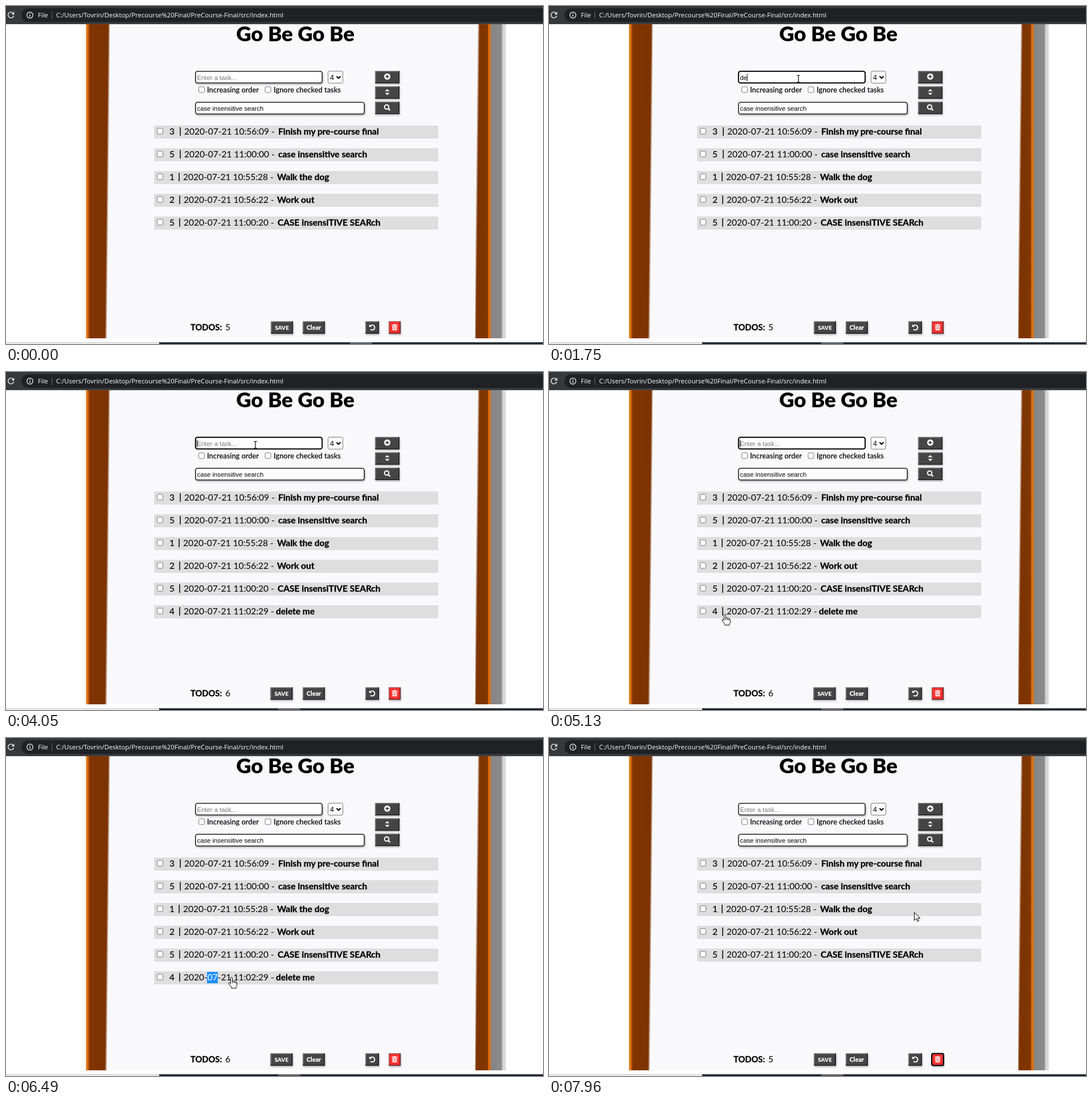
Animation, 943 px wide and 594 px high, one loop 8 s. Source, as an HTML page:

```html
<!DOCTYPE html>
<html lang="en">
<head>
<meta charset="utf-8">
<title>Task list</title>
<style>
  html, body { margin: 0; width: 100%; height: 100%; overflow: hidden; background: #fff; }
  svg { display: block; width: 943px; height: 594px; }
  text { white-space: pre; }
  .hand { font: 15.5px Lato, sans-serif; stroke-width: .2px; }
  .bold { font-weight: 700; stroke: #000; stroke-width: .3px; }
  .title { font: 900 36.5px Lato, sans-serif; }
  .label { font: 600 12.8px Lato, sans-serif; }
  .field { font: 11.3px "Liberation Sans", Arial, sans-serif; }
  .url { font: 11.3px "Open Sans", sans-serif; fill: #fff; }
</style>
</head>
<body>
<svg id="stage" viewBox="0 0 943 594">
  <defs>
    <linearGradient id="leftWood">
      <stop offset="0" stop-color="#e2801f"/><stop offset=".07" stop-color="#dc700f"/>
      <stop offset=".11" stop-color="#b85408"/><stop offset=".16" stop-color="#803400"/>
      <stop offset="1" stop-color="#7c3300"/>
    </linearGradient>
    <linearGradient id="rightEdge" gradientUnits="userSpaceOnUse" x1="824" x2="879" y1="0" y2="0">
      <stop offset="0" stop-color="#7c3300"/><stop offset=".39" stop-color="#823600"/>
      <stop offset=".43" stop-color="#d96c10"/><stop offset=".48" stop-color="#d97218"/>
      <stop offset=".52" stop-color="#858585"/><stop offset=".83" stop-color="#8c8c8c"/>
      <stop offset=".88" stop-color="#d2d2d2"/><stop offset=".96" stop-color="#dcdcdc"/>
      <stop offset="1" stop-color="#fff"/>
    </linearGradient>
    <radialGradient id="glowFill">
      <stop offset="0" stop-color="#ffe600" stop-opacity=".75"/>
      <stop offset=".75" stop-color="#ffe600" stop-opacity=".6"/>
      <stop offset="1" stop-color="#ffe600" stop-opacity=".15"/>
    </radialGradient>
    <filter id="soft" x="-2%" y="-2%" width="104%" height="104%"><feGaussianBlur stdDeviation="1.1"/></filter>
    <filter id="shadow" x="-10%" y="-30%" width="120%" height="180%">
      <feDropShadow dx="1" dy="2" stdDeviation="1.5" flood-opacity=".3"/>
    </filter>
    <clipPath id="page"><rect y="32" width="943" height="552"/></clipPath>
  </defs>
  <g id="scene"></g>
  <circle id="glow" r="11" fill="url(#glowFill)"/>
  <g id="cursor">
    <path id="arrow" d="M.5.5V14.5L4 11.4 6.2 16.5 8.4 15.5 6.2 10.6H10.8Z" fill="#fff" stroke="#000"/>
    <path id="ibeam" d="M-3-6H-1Q0-6 0-5Q0-6 1-6H3M0-5V5M-3 6H-1Q0 6 0 5Q0 6 1 6H3" fill="none" stroke="#000" stroke-width="1.2"/>
    <path id="pointer" d="M-1.5 1.5Q0-1 1.5 1.5V7Q3.5 6 4.5 8Q6.5 7 7.3 9Q9.5 8.5 9.5 11V14.5Q9.2 16.5 8 18V19.8H0V18L-4.8 11.8Q-5.3 9.4-3.2 9.8L-1.5 11.5ZM1.5 7V11M4.5 8V11M7.3 9V11.5" fill="#fff" stroke="#000"/>
  </g>
</svg>
<script>
const $ = id => document.getElementById(id);
const DURATION = 8000;

const text = (x, y, cls, value, extra = '') => `<text x="${x}" y="${y}" class="${cls}" ${extra}>${value}</text>`;
const rect = (x, y, w, h, fill, extra = '') =>
  `<rect x="${x}" y="${y}" width="${w}" height="${h}" fill="${fill}" ${extra}/>`;
const path = (d, extra) => `<path d="${d}" ${extra}/>`;
const checkbox = (x, y) => rect(x + .5, y + .5, 10, 10, '#fff', 'rx="1.8" stroke="#767676"');
const field = (x, y, w, id) =>
  rect(x + .8, y + .8, w - 1.6, 20.4, '#fff', `id="${id}" rx="3.5" stroke="#222" stroke-width="1.6" filter="url(#shadow)"`);

function button(x, y, w, icon, fill = '#444') {
  const h = 22, light = fill === '#444' ? '#7d7d7d' : '#a55', dark = fill === '#444' ? '#222' : '#622';
  return `<g transform="translate(${x} ${y})">${rect(0, 0, w, h, fill, 'filter="url(#shadow)"')}
    ${path(`M.8 ${h}V.8H${w}`, `fill="none" stroke="${light}" stroke-width="1.6"`)}
    ${path(`M0 ${h - .8}H${w - .8}V0`, `fill="none" stroke="${dark}" stroke-width="1.6"`)}
    <g transform="translate(${w / 2} ${h / 2})" fill="#fff" stroke="#fff" stroke-width="0">${icon}</g></g>`;
}
const caption = (value, size) =>
  `<text y="3.6" text-anchor="middle" style="font:900 ${size}px Lato,sans-serif">${value}</text>`;

const icons = {
  add: '<circle cy="-1" r="5.5"/>' + path('M-3-1H3M0-4V2', 'stroke="#444" stroke-width="1.8"'),
  sort: path('M-4-2.2L0-6 4-2.2ZM-4 .8H4L0 4.6Z', ''),
  search: '<circle cx="-1" cy="-1.5" r="3.8" fill="none" stroke-width="2"/>' + path('M2 1.5L5 4.5', 'stroke-width="2.4"'),
  undo: path('M-3.2-3A4.4 4.4 0 1 1-3 3.2', 'fill="none" stroke-width="1.9"') + path('M-5.2-5.5V-.9H-.6Z', ''),
  trash: path('M-5-5H-2L-1.2-6H1.2L2-5H5V-3.5H-5ZM-4.2-2.5H4.2L3.6 5H-3.6Z', '') +
    path('M-1.8-1V3.6M0-1V3.6M1.8-1V3.6', 'stroke="#f33" stroke-width=".8"'),
};

const tasks = [
  [3, '10:56:09', 'Finish my pre-course final', 313, 478],
  [5, '11:00:00', 'case insensitive search', 313, 478],
  [1, '10:55:28', 'Walk the dog', 311, 476],
  [2, '10:56:22', 'Work out', 312, 476],
  [5, '11:00:20', 'CASE insensiTIVE SEARch', 312, 477],
  [4, '11:02:29', 'delete me', 312, 474],
];
const rowTop = i => 210 + 40 * i;

function taskRow([priority, clock, name, dateX, nameX], i) {
  const y = rowTop(i), last = i === 5;
  return `<g ${last ? 'id="newRow"' : ''}>
    ${rect(260, y, 499, 23, '#dededf', last ? 'id="newRowBack"' : '')}
    ${last ? rect(353, y + 1, 19, 20, '#1e90ff', 'id="selection"') : ''}
    ${checkbox(265, y + 4.5)}
    ${text(287, y + 15.5, 'hand', priority, 'stroke="#000"')}
    ${path(`M${dateX - 7} ${y + 3}v15`, 'stroke="#000" stroke-width="1.5"')}
    ${text(dateX, y + 15.5, 'hand', `2020-<tspan ${last ? 'id="month"' : ''}>07</tspan>-21 ${clock} -`)}
    ${text(nameX, y + 15.5, 'hand bold', name)}</g>`;
}

$('scene').innerHTML = [
  // browser bar
  rect(0, 0, 943, 32, '#37383b'),
  rect(27, 4, 940, 24, '#202124', 'rx="12"'),
  rect(0, 31, 943, 1, '#4a4a4c'),
  path('M12.8 13A5 5 0 1 0 13.5 17', 'fill="none" stroke="#ddd" stroke-width="1.6"'),
  path('M14.5 10V15H9.5Z', 'fill="#ddd"'),
  '<circle cx="42" cy="16" r="5.3" fill="none" stroke="#eee" stroke-width="1.3"/>',
  path('M42 15V19M42 12.5V14', 'stroke="#eee" stroke-width="1.4"'),
  text(56, 20, 'url', 'File'),
  rect(80, 9, 1, 14, '#5f6368'),
  text(88, 20, 'url', 'C:/Users/Tovrin/Desktop/Precourse%20Final/PreCourse-Final/src/index.html'),
  // board
  '<g clip-path="url(#page)">',
  rect(140.5, 32, 42, 552, 'url(#leftWood)'),
  rect(824, 32, 55, 552, 'url(#rightEdge)'),
  path('M181.5 20H830.2L823.7 596H175.5Z', 'fill="#f9f9fc" filter="url(#soft)"'),
  '</g>',
  // task bar
  rect(0, 591, 269, 2, '#d6d6d6'),
  rect(269, 591, 674, 3, '#1c2530'),
  rect(478, 591, 39, 3, '#5a626b', 'id="activeTab"'),
  // form
  text(508, 62, 'title', 'Go Be Go Be', 'text-anchor="middle"'),
  field(332, 114, 224, 'taskField'),
  text(335.5, 129.5, 'field', '', 'id="entry"'),
  rect(335, 119, 1, 13, '#000', 'id="caret"'),
  rect(565.5, 114.5, 26, 21, '#fff', 'rx="2" stroke="#767676"'),
  text(569, 129.5, 'field', '4', 'style="font-size:12.5px"'),
  path('M580.5 123.5L584 127 587.5 123.5', 'fill="none" stroke="#000" stroke-width="2"'),
  checkbox(338, 141.5), text(353, 152, 'label', 'Increasing order'),
  checkbox(454.5, 141.5), text(470, 152, 'label', 'Ignore checked tasks'),
  field(332, 168.5, 298, 'searchField'),
  text(335.5, 184, 'field', 'case insensitive search'),
  button(648, 114, 43, icons.add),
  button(648, 141, 43, icons.sort),
  button(648, 168, 43, icons.search),
  ...tasks.map(taskRow),
  // footer
  text(324, 570, 'hand bold', 'TODOS:', 'style="font-size:14.7px"'),
  text(385, 570, 'hand', '5', 'id="count"'),
  `<g id="save">${button(465, 554, 39, caption('SAVE', 10))}</g>`,
  button(521, 554, 39, caption('Clear', 10.8)),
  button(631, 554, 24, icons.undo),
  button(672, 554, 21, icons.trash, '#f33'),
  rect(672, 554.5, 21, 21, 'none', 'id="trashFocus" rx="2.5" stroke="#000" stroke-width="2"'),
].join('');

// [time, x, y]
const cursorPath = [
  [50, 862, 594], [820, 438, 128], [4600, 438, 128], [5130, 309, 425], [5230, 295, 427],
  [5390, 340, 428], [5630, 360, 426], [6300, 360, 426], [6490, 396, 420], [6560, 397, 420],
  [6810, 397, 420], [7450, 685, 561], [7770, 685, 561], [7960, 641, 306],
];
const keyTimes = [1440, 1750, 2000, 2310, 2560, 2610, 3060, 3310, 3490];
const typed = 'delete me';
const clicks = [[870, 1010], [5810, 5860], [7450, 7520]];
const FOCUS = 940, ENTER = 3980, BLUR = 5810, MARK = 5860, SELECT = 6560, REMOVE = 7520;

const within = (t, from, to) => t >= from && t < to;
const show = (id, on) => $(id).setAttribute('visibility', on ? 'visible' : 'hidden');
const inside = (x, y, l, t, r, b) => x >= l && x <= r && y >= t && y <= b;

function cursorAt(t) {
  const next = cursorPath.findIndex(point => point[0] > t);
  if (next < 1) return (next ? cursorPath.at(-1) : cursorPath[0]).slice(1);
  const [t0, x0, y0] = cursorPath[next - 1], [t1, x1, y1] = cursorPath[next];
  const k = (t - t0) / (t1 - t0);
  return [x0 + (x1 - x0) * k, y0 + (y1 - y0) * k];
}

// The hand appears over the words of a row, not over its empty right part.
function cursorKind(x, y, rows) {
  if (inside(x, y, 332, 114, 556, 136) || inside(x, y, 332, 168, 630, 190)) return 'ibeam';
  const onRow = tasks.slice(0, rows).some((_, i) => inside(x, y, 280, rowTop(i), 575, rowTop(i) + 23));
  const onButton = inside(x, y, 648, 114, 691, 190) || inside(x, y, 631, 554, 693, 576);
  return onRow || onButton ? 'pointer' : 'arrow';
}

function draw(t) {
  const focused = within(t, FOCUS, BLUR), added = within(t, ENTER, REMOVE);
  const value = t < ENTER ? typed.slice(0, keyTimes.filter(k => k <= t).length) : '';

  const entry = $('entry');
  entry.textContent = value || 'Enter a task...';
  entry.setAttribute('fill', value ? '#000' : '#757575');
  $('caret').setAttribute('x', 335 + (value ? entry.getComputedTextLength() : 0));
  show('caret', focused && !within(t, 4600, 5110) && t < 5610);
  $('taskField').setAttribute('stroke', focused ? '#000' : '#222');
  $('taskField').setAttribute('stroke-width', focused ? 2 : 1.6);
  $('taskField').setAttribute('filter', focused ? 'none' : 'url(#shadow)');
  $('activeTab').setAttribute('x', t < FOCUS ? 604 : 478);

  const marked = added && within(t, MARK, SELECT);
  show('newRow', added);
  show('selection', marked);
  $('month').setAttribute('fill', marked ? '#fff' : '#000');
  $('newRowBack').setAttribute('fill', t >= SELECT ? '#a3e4ff' : '#dededf');
  $('count').textContent = added ? 6 : 5;
  $('save').setAttribute('transform', `translate(${added ? -.7 : 0} 0)`);
  show('trashFocus', t >= 7450);

  const [x, y] = cursorAt(t), kind = cursorKind(x, y, added ? 6 : 5);
  $('cursor').setAttribute('transform', `translate(${x} ${y})`);
  for (const id of ['arrow', 'ibeam', 'pointer']) show(id, id === kind && t >= 50);
  $('glow').setAttribute('cx', x - 1);
  $('glow').setAttribute('cy', y + 2);
  show('glow', clicks.some(([from, to]) => within(t, from, to)));
}

// Inherited visibility lets the selection hide on its own inside the new row.
const start = performance.now();
function tick() {
  draw((performance.now() - start) % DURATION);
  requestAnimationFrame(tick);
}
tick();
</script>
</body>
</html>
```
